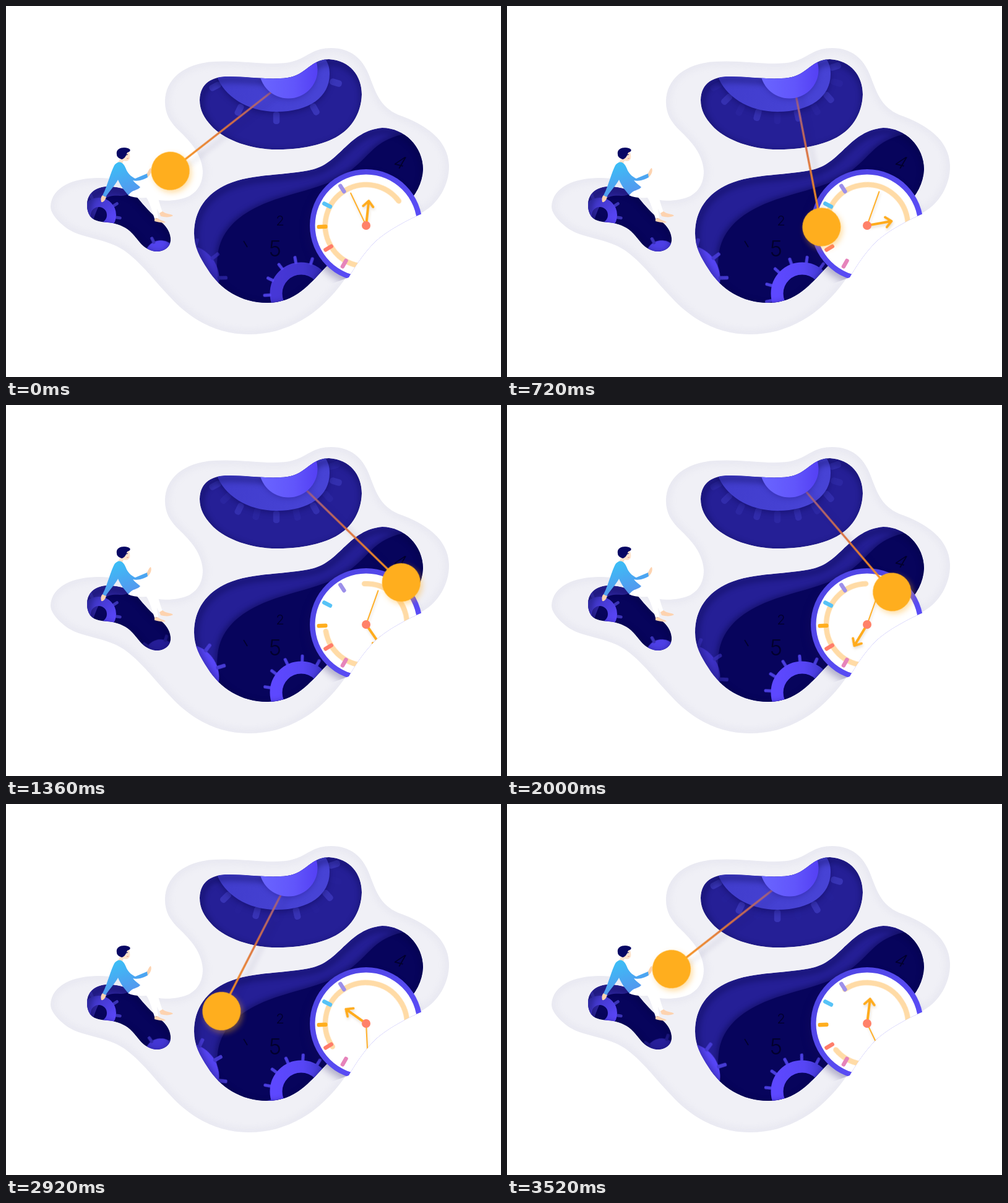
Animation of 800x600 px, one loop 3.56 s. Source, as an HTML page:

```html
<!DOCTYPE html>
<html lang="en">
<head>
<meta charset="utf-8">
<title>Pendulum</title>
<style>
  html, body { margin: 0; width: 100%; height: 100%; overflow: hidden; background: #fff; }
  svg { display: block; width: 800px; height: 600px; }
  .digit { font-family: Inter, "Open Sans", sans-serif; font-weight: 300; fill: #02012c; text-anchor: middle; }
  .rod { filter: drop-shadow(9px 6px 4px rgba(20, 10, 80, .16)); }
  .glow { filter: drop-shadow(3px 4px 5px rgba(255, 174, 31, .42)); }
  .hand { filter: drop-shadow(1px 3px 2px rgba(120, 70, 0, .18)); }
  .shade { fill: none; stroke: #02003a; stroke-width: 9; opacity: .35; filter: blur(5px); transform: translate(2px, 5px); }
  .rim { fill: none; stroke: #c4c4dc; stroke-width: 10; opacity: .22; filter: blur(6px); }
</style>
</head>
<body>
<svg viewBox="0 0 800 600" xmlns="http://www.w3.org/2000/svg">
  <defs>
    <path id="blob" d="M525 68C558 68 576 86 586 110C598 140 603 162 634 176C680 192 716 218 716 260C716 290 698 320 674 333C640 346 615 362 597 377C580 393 566 414 552 435C535 462 508 491 478 508C452 523 424 531 392 531C345 531 305 511 272 478C243 449 222 418 192 396C160 374 120 377 95 357C79 344 72 333 72 324C74 292 110 278 150 278C194 278 206 293 228 308C244 317 275 317 295 308C312 299 318 284 318 267C316 238 298 220 280 202C264 187 257 173 257 155C257 118 288 93 335 90C380 87 418 96 452 92C485 88 492 68 525 68Z"/>
    <path id="top" d="M313 152C314 124 333 114 360 114C392 114 425 120 455 116C485 112 492 86 522 86C556 88 575 113 575 143C574 176 556 202 528 215C500 228 466 233 430 232C388 230 350 214 332 194C320 181 313 168 313 152Z"/>
    <path id="low" d="M304 368C304 330 324 303 358 288C400 270 452 275 497 264C541 252 554 202 608 197C644 197 674 228 674 264C672 310 630 340 590 365C556 388 535 405 517 422C490 450 468 480 422 480C380 480 346 458 326 426C313 406 304 390 304 368Z"/>
    <path id="seat" d="M131 322C131 302 146 292 166 292C190 293 205 300 216 314C228 329 240 340 254 352C262 360 267 370 266 380C265 391 254 398 241 397C221 394 214 378 204 368C195 358 184 354 172 351C156 349 144 350 136 340C132 334 131 328 131 322Z"/>
    <clipPath id="inBlob"><use href="#blob"/></clipPath>
    <clipPath id="inTop"><use href="#top"/></clipPath>
    <clipPath id="inLow"><use href="#low"/></clipPath>
    <clipPath id="inSeat"><use href="#seat"/></clipPath>
    <clipPath id="inClock"><path d="M677 334C643 348 617 364 599 379C582 395 567 416 554 439L470 470V230H720Z"/></clipPath>
    <linearGradient id="sweater" x1="0" y1="0" x2=".4" y2="1">
      <stop stop-color="#38c4f7"/><stop offset="1" stop-color="#5596ee"/>
    </linearGradient>
    <linearGradient id="disc">
      <stop stop-color="#6a66ff"/><stop offset=".6" stop-color="#6155fb"/><stop offset="1" stop-color="#5440f4"/>
    </linearGradient>
    <linearGradient id="plate" x1="0" y1="0" x2="1" y2=".3">
      <stop stop-color="#3f3bca"/><stop offset="1" stop-color="#4743d5"/>
    </linearGradient>
    <linearGradient id="ring">
      <stop stop-color="#5d48ff"/><stop offset=".55" stop-color="#5645f4"/><stop offset="1" stop-color="#3d37c8"/>
    </linearGradient>
    <linearGradient id="ringP" x1="0" y1="0" x2="1" y2="1">
      <stop stop-color="#3b34bd"/><stop offset="1" stop-color="#5d48ff"/>
    </linearGradient>
    <linearGradient id="bezel" x1="0" y1="0" x2="1" y2="1">
      <stop stop-color="#4c43e0"/><stop offset="1" stop-color="#6050ff"/>
    </linearGradient>
    <linearGradient id="wire" x1="0" y1="0" x2="0" y2="1">
      <stop stop-color="#8f5a92"/><stop offset=".5" stop-color="#d9713f"/><stop offset="1" stop-color="#f9941c"/>
    </linearGradient>
  </defs>

  <use href="#blob" fill="#f0f0f6"/>
  <g clip-path="url(#inBlob)"><use href="#blob" class="rim"/></g>

  <g clip-path="url(#inTop)">
    <use href="#top" fill="#251f96"/>
    <g id="ticksA"></g>
    <g id="ticksB"></g>
    <path d="M340 112C352 146 390 171 437 171C490 171 523 147 523 110C523 98 520 90 512 80L340 80Z" fill="url(#plate)" style="filter:drop-shadow(0 4px 5px rgba(5,0,70,.35))"/>
    <use href="#top" class="shade"/>
  </g>

  <g clip-path="url(#inLow)">
    <use href="#low" fill="#251f96"/>
    <path d="M360 490C342 466 339 432 342 404C346 366 372 341 408 324C453 302 516 296 553 269C588 243 592 223 632 210C644 206 660 206 690 210V490Z" fill="#07045c" style="filter:drop-shadow(-3px -2px 5px rgba(3,0,60,.45))"/>
    <g class="digit">
      <text x="443" y="355" font-size="22">2</text>
      <text x="435" y="405" font-size="35">5</text>
      <text font-size="28" transform="translate(632 262) rotate(14) skewX(-16)">4</text>
    </g>
    <path d="M384 380L390 390" stroke="#02012c" stroke-width="1.6"/>
    <g transform="translate(290 441)"><g id="gearL">
      <circle r="54.500" fill="#5846f8"/>
    </g></g>
    <g transform="translate(477 465)"><g id="gearM"></g>
      <circle id="rimM" r="40.500" fill="none" stroke="url(#ring)" stroke-width="20"/>
    </g>
    <use href="#low" class="shade"/>
  </g>

  <g clip-path="url(#inSeat)">
    <use href="#seat" fill="#07045c"/>
    <path d="M125 285H205C206 300 198 308 184 307C162 306 152 310 140 350L125 340Z" fill="#2b2399"/>
    <g transform="translate(150 338)"><g id="gearP"></g>
      <circle r="20.500" fill="none" stroke="url(#ringP)" stroke-width="15"/>
    </g>
    <g transform="translate(250 405)"><g id="gearS"><circle r="26" fill="#5243ef"/></g></g>
    <use href="#seat" class="shade"/>
  </g>

  <g id="person">
    <path d="M197 306C203 294 222 290 236 294C244 298 247 318 253 333L248 336L244 328L246 343L240 344C236 331 232 317 227 310C216 311 205 310 197 306Z" fill="#fff"/>
    <g fill="#fdd3b0">
      <path d="M240 344L245 343C249 347 256 347 258 350C254 351 247 350 240 348Z"/>
      <path d="M248 335L253 332C258 337 267 336 270 339C266 342 257 342 250 340Z"/>
      <path d="M156 306L162 308C161 313 158 318 154 317C153 313 153 309 156 306Z"/>
      <path d="M227 272C230 268 231 263 234 262C236 266 234 273 229 277Z"/>
      <path d="M189 239L198 235C200 239 201 243 200 247C197 252 192 251 190 250L187 257L181 253Z" fill="#fee2cb"/>
    </g>
    <path d="M179 254C187 249 192 258 195 266C199 273 204 277 209 279L228 271L229 277C222 281 213 284 205 282C209 287 214 290 217 293C210 300 205 296 198 306C192 300 186 292 181 281C176 290 167 300 161 309L156 306C162 296 169 270 174 260C175 257 177 255 179 254Z" fill="url(#sweater)"/>
    <path d="M179 240C177 231 188 227 197 230C203 232 201 236 196 237C194 242 192 247 187 248C182 246 179 244 179 240Z" fill="#080764"/>
    <path d="M194 241L197 240" stroke="#080764"/>
    <path d="M195 247L198 246" stroke="#ee9a84"/>
  </g>

  <g clip-path="url(#inClock)">
    <circle cx="582" cy="355" r="91" fill="url(#bezel)" style="filter:drop-shadow(-5px 6px 6px rgba(20,10,90,.28))"/>
    <circle cx="582" cy="355" r="82.500" fill="#fff"/>
    <g transform="translate(582 355)">
      <circle id="arc" r="66" fill="none" stroke="#ffdba6" stroke-width="8.500" stroke-linecap="round" pathLength="360" stroke-dasharray="263 97"/>
      <g id="marks"></g>
      <g class="hand"><g id="second"><path d="M0 0V-58" stroke="#ffb02a" stroke-width="2" stroke-linecap="round"/></g></g>
      <g class="hand"><g id="arrow"><path d="M0 0V-39M-8 -31L0 -40L8 -31" fill="none" stroke="#ffab1c" stroke-width="4" stroke-linecap="round" stroke-linejoin="round"/></g></g>
      <circle r="7" fill="#ff8169"/>
    </g>
  </g>

  <g class="rod"><g transform="translate(461 114)"><g class="swing"><rect x="-1.600" y="24" width="3.200" height="205" fill="url(#wire)"/></g></g></g>
  <g clip-path="url(#inTop)">
    <ellipse cx="456.500" cy="103.500" rx="47" ry="46" fill="url(#disc)" style="filter:drop-shadow(0 2px 4px rgba(10,0,90,.25))"/>
  </g>
  <g class="glow"><g transform="translate(461 114)"><g class="swing"><circle cy="248" r="31" fill="#ffae1e"/></g></g></g>
</svg>
<script>
const LOOP = 3560;
const $ = id => document.getElementById(id);

function bar(parent, x, y, turn, w, h, fill) {
  const r = document.createElementNS('http://www.w3.org/2000/svg', 'rect');
  const attrs = { x: -w / 2, y: -h / 2, width: w, height: h, rx: w / 2.4, fill,
    transform: `translate(${x} ${y}) rotate(${turn})` };
  for (const k in attrs) r.setAttribute(k, attrs[k]);
  parent.appendChild(r);
}

// Bar on a circle; angle runs clockwise from the top.
function spoke(parent, radius, angle, w, h, fill) {
  const a = angle * Math.PI / 180;
  bar(parent, radius * Math.sin(a), -radius * Math.cos(a), angle, w, h, fill);
}

function teeth(id, count, radius, w, h, fill) {
  for (let i = 0; i < count; i++) spoke($(id), radius, i * 360 / count, w, h, fill);
}

const topTicks = {
  ticksA: [[338, 130, 63], [377, 168, 26], [437, 181, 0], [499, 167, -29], [533, 124, -73]],
  ticksB: [[355, 151, 46], [405, 176, 15], [470, 177, -13], [520, 148, -42], [530, 98, -107]]
};
for (const id in topTicks)
  for (const [x, y, turn] of topTicks[id]) bar($(id), x, y, turn, 10.5, 20, '#3a36b8');

teeth('gearL', 10, 60, 6, 16, '#463bd4');
teeth('gearM', 13, 55, 5, 13, '#4a3ee0');
teeth('gearS', 5, 29, 5, 12, '#3c34bd');
teeth('gearP', 9, 32, 5, 10, '#3a33b5');
$('gearP').setAttribute('transform', 'rotate(18)');

['#9c8fea', '#57c3f7', '#ffae1e', '#ff7d6a', '#e684bb']
  .forEach((c, i) => spoke($('marks'), 71, 327 - i * 29.3, 6.5, 17, c));

const play = (el, frames) => el.animate(frames, { duration: LOOP, iterations: Infinity });
const turn = deg => `rotate(${deg}deg)`;
const spin = (id, from, speed) =>
  play($(id), [{ transform: turn(from) }, { transform: turn(from + speed * LOOP) }]);
const steps = (el, prop, table) =>
  play(el, table.map(([t, v]) => ({ offset: t / LOOP, [prop]: v })));

spin('arc', 60, 0.1525);
spin('arrow', 6, 0.1025);
spin('second', 334, 0.5625);
spin('gearL', 16.5, 0.2);
spin('gearM', 18, -0.0525);

for (const el of document.querySelectorAll('.swing'))
  play(el, [
    { offset: 0, transform: turn(52), easing: 'cubic-bezier(.2,.05,.45,1)' },
    { offset: 1640 / LOOP, transform: turn(-49), easing: 'cubic-bezier(.37,0,.63,1)' },
    { offset: 1, transform: turn(52) }
  ]);

// The two sets of plate ticks trade places three times per loop.
const beats = [0, 1, 2, 3, 4, 5, 6].map(i => [i * LOOP / 6, i % 2]);
steps($('ticksA'), 'opacity', beats.map(([t, v]) => [t, 1 - v]));
steps($('ticksB'), 'opacity', beats);

steps($('rimM'), 'opacity', [[0, .75], [600, 1], [LOOP, 1]]);
steps($('gearL'), 'opacity', [[0, .5], [720, .95], [1360, 1], [2000, .5], [2520, .5], [2920, .95], [LOOP, 1]]);

const pulse = [[0, 0], [720, .1], [1360, 1], [2000, .1], [2520, 0], [2920, .3], [LOOP, 1]];
steps($('gearS'), 'transform', pulse.map(([t, v]) => [t, turn(-26 - 29 * v)]));
steps($('gearS'), 'opacity', pulse.map(([t, v]) => [t, 1 - .6 * v]));
</script>
</body>
</html>
```
